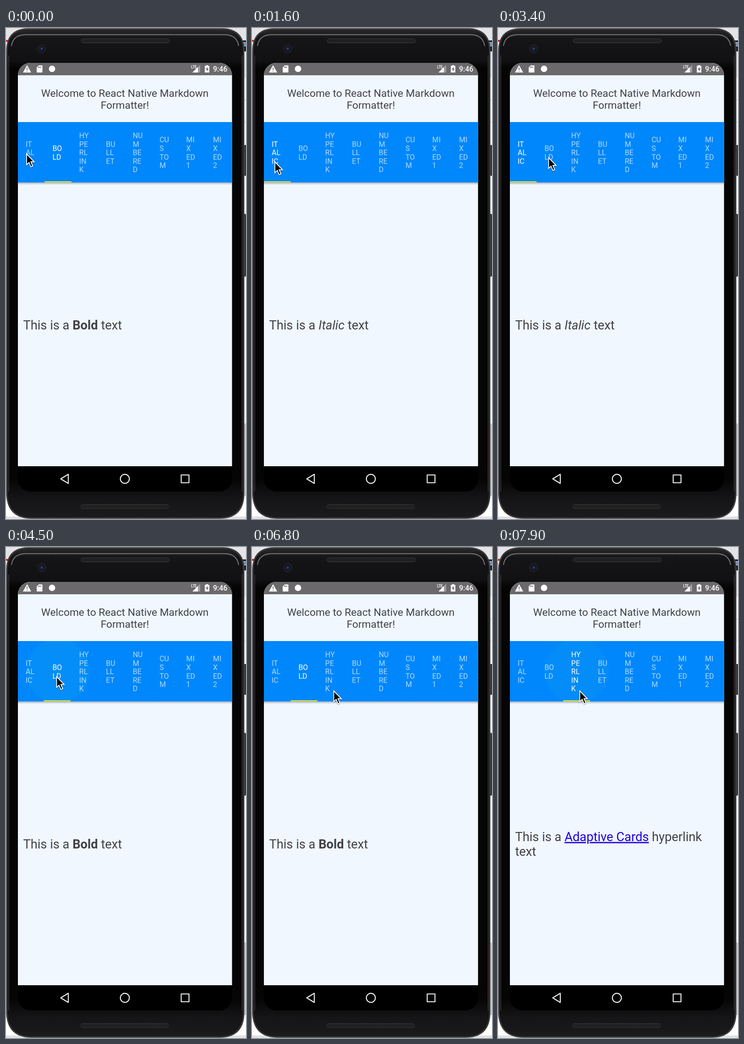
An HTML page that plays this animation: 524 px wide and 1070 px high, repeating every 8000 ms.

```html
<!DOCTYPE html>
<html lang="en">
<head>
<meta charset="utf-8">
<title>Markdown formatter tabs</title>
<style>
  html, body { margin: 0; width: 100%; height: 100%; overflow: hidden; background: #e4e4e8; }
  svg { display: block; width: 524px; height: 1070px; font-family: Roboto, sans-serif; }
  .title { font-size: 22.73px; text-anchor: middle; fill: #414246; }
  .body { font-size: 27.27px; fill: #414246; }
  .body .link { fill: #2000e0; text-decoration: underline; }
  #labels { font-size: 15.91px; fill: #fff; }
</style>
</head>
<body>
<svg viewBox="0 0 524 1070">
  <defs>
    <linearGradient id="shell" x2="0" y2="1">
      <stop offset="0" stop-color="#29282a"/><stop offset=".02" stop-color="#151416"/>
      <stop offset=".065" stop-color="#111012"/><stop offset=".08" stop-color="#050505"/>
      <stop offset=".92" stop-color="#060506"/><stop offset=".96" stop-color="#151416"/>
      <stop offset="1" stop-color="#1b1a1c"/>
    </linearGradient>
    <linearGradient id="shade" x2="0" y2="1">
      <stop offset="0" stop-color="#6c7a88" stop-opacity=".6"/><stop offset="1" stop-color="#6c7a88" stop-opacity="0"/>
    </linearGradient>
    <pattern id="mesh" width="3" height="3" patternUnits="userSpaceOnUse">
      <rect width="3" height="3" fill="#1b1a1b"/><circle cx="1.5" cy="1.5" r=".8" fill="#383738"/>
    </pattern>
    <clipPath id="screen"><rect x="26" y="76" width="467.5" height="934" rx="27"/></clipPath>
    <clipPath id="bar"><rect x="26" y="205" width="467.5" height="131.5"/></clipPath>
  </defs>

  <!-- desktop behind the phone -->
  <path fill="#fff" d="M0 31H6V50H0ZM516 108H524V862H516ZM0 1020H524V1065H0Z"/>
  <path fill="#d32a22" d="M0 26H8V30H0Z"/>
  <path fill="#1d2530" d="M517 27H524V31H517ZM519 40H524V51H519Z"/>
  <path fill="#6a8fc4" d="M518 32H524V39H518Z"/>
  <path fill="#c9c9cd" d="M518 157H524V158H518ZM518 205H524V206H518ZM516 862H524V1020H516ZM0 1065H524V1066H0Z"/>
  <path fill="#38383a" d="M517 255H524V322H517ZM517 405H522Q524 405 524 409V538Q524 542 522 542H517Z"/>

  <!-- phone -->
  <path fill="url(#shell)" stroke="#3a393b" stroke-width="3"
    d="M2 48Q3 3 48 2H473Q518 3 519 48V1018Q517 1067 468 1068H54Q5 1067 2 1018Z"/>
  <path fill="none" stroke="#3a393c" stroke-width="1.5" d="M6 60V1010M515.500 60V1010"/>
  <path fill="none" stroke="#77767a" stroke-width="2" d="M12 39Q15 15 43 14.500H478Q504 15 508 39"/>
  <rect x="164" y="23.500" width="193" height="9" rx="4.500" fill="url(#mesh)" stroke="#3b3a3b"/>
  <rect x="163" y="1038.500" width="192" height="9" rx="4.500" fill="url(#mesh)" stroke="#343334"/>
  <circle cx="78" cy="45" r="9.500" fill="#19191d" stroke="#28282b"/>
  <circle cx="78" cy="45" r="5" fill="#111b35"/>
  <circle cx="78" cy="45" r="2" fill="#334b83"/>

  <g clip-path="url(#screen)">
    <path fill="#f0f7fe" d="M26 76H494V955H26Z"/>
    <path fill="#6b696b" d="M26 76H494V103H26Z"/>
    <path d="M26 955H494V1010H26Z"/>
  </g>

  <!-- status bar -->
  <g fill="#fff">
    <path d="M46 81L55 97H37Z"/>
    <path d="M71.500 81.500H78.500Q79.500 81.500 79.500 82.500V96Q79.500 97 78.500 97H68Q67 97 67 96V86Z"/>
    <circle cx="100.500" cy="89" r="7"/>
    <text x="404" y="87.500" font-size="8.500" font-weight="500" letter-spacing="-.6">LTE</text>
    <path opacity=".35" d="M424 80V97H407Z"/>
    <path d="M419 85V97H407Z"/>
    <path d="M437 81H441V82.500H444V97H434V82.500H437Z"/>
    <text x="452" y="95.300" font-size="15.910" font-weight="500">9:46</text>
  </g>
  <path fill="#6b696b" d="M45.200 86H46.900V91.500H45.200ZM45.200 93.200H46.900V95H45.200ZM70 84H71.500V87H70ZM72.500 84H74V87H72.500ZM75 84H76.500V87H75ZM440 84.500L436 90.500H438.500V95L442.300 89H440Z"/>

  <text class="title" x="259.500" y="149.800">Welcome to React Native Markdown</text>
  <text class="title" x="259.500" y="176.400">Formatter!</text>

  <!-- tabs -->
  <path fill="url(#shade)" d="M26 336H493.500V342H26Z"/>
  <path fill="#0187fc" d="M26 205H493.500V336.500H26Z"/>
  <g clip-path="url(#bar)"><circle id="ripple" cy="270.800" fill="#1cb4d8"/></g>
  <g id="labels"></g>
  <rect id="indicator" y="334" width="58.400" height="2.500" fill="#e6e03a"/>

  <g id="pages" class="body">
    <text x="37.400" y="656.800">This is a <tspan font-style="italic">Italic</tspan> text</text>
    <text x="37.400" y="656.800">This is a <tspan font-weight="700">Bold</tspan> text</text>
    <g>
      <text x="37.400" y="640.800">This is a <tspan class="link">Adaptive Cards</tspan> hyperlink</text>
      <text x="37.400" y="672.800">text</text>
    </g>
  </g>

  <!-- navigation -->
  <g fill="none" stroke="#ececec" stroke-width="2.200" stroke-linejoin="round">
    <path d="M136 972.500V992.500L119.500 982.500Z"/>
    <circle cx="259.500" cy="982.500" r="9.800"/>
    <path d="M382.500 974H399.500V991H382.500Z"/>
  </g>

  <path id="cursor" stroke="#fff" stroke-width="1.800" style="filter:drop-shadow(0 1px 1px #0006)"
    d="M0 0V23.500L5.300 18.500L9.300 28L13.300 26.300L9.300 17H16.500Z"/>
</svg>

<script>
const LOOP = 8000, TAB = 58.43, LEFT = 26;
const $ = id => document.getElementById(id);

const names = ['IT AL IC', 'BO LD', 'HY PE RL IN K', 'BU LL ET',
  'NU M BE RE D', 'CU S TO M', 'MI X ED 1', 'MI X ED 2'];
$('labels').innerHTML = names.map((name, tab) => {
  const lines = name.split(' ');
  return '<g>' + lines.map((line, i) => {
    const y = 277.2 + (i - (lines.length - 1) / 2) * 18.6;
    return `<text x="${LEFT + 17 + tab * TAB}" y="${y}">${line}</text>`;
  }).join('') + '</g>';
}).join('');

const taps = [{ at: 400, tab: 0 }, { at: 4100, tab: 1 }, { at: 7400, tab: 2 }];
const moves = [
  { start: 1400, end: 2200, from: [45, 274.5], to: [77, 385.5] },
  { start: 2700, end: 3300, from: [77, 385.5], to: [110.5, 282.5] },
  { start: 5700, end: 6500, from: [110.5, 282.5], to: [178.5, 313.5] },
];

const clamp = v => Math.min(1, Math.max(0, v));
const smooth = v => v * v * (3 - 2 * v);

// Critically damped spring, t in ms
function spring(t) {
  const x = 0.0172 * Math.max(0, t);
  return 1 - (1 + x) * Math.exp(-x);
}

function drawTabs(t) {
  let position = 1, page = 1, ripple = null;
  for (const tap of taps) {
    const since = t - tap.at;
    if (since < 0) break;
    position += (tap.tab - position) * spring(since - 100);
    if (since >= 100) page = tap.tab;
    ripple = { tab: tap.tab, since };
  }
  $('indicator').setAttribute('x', LEFT + position * TAB);
  [...$('labels').children].forEach((label, i) =>
    label.setAttribute('opacity', 0.68 + 0.32 * clamp(1 - Math.abs(position - i))));
  [...$('pages').children].forEach((el, i) => el.style.display = i === page ? '' : 'none');

  const circle = $('ripple');
  circle.setAttribute('opacity', ripple ? 0.16 * clamp((700 - ripple.since) / 300) : 0);
  if (ripple) {
    circle.setAttribute('cx', LEFT + (ripple.tab + 0.5) * TAB);
    circle.setAttribute('r', 70 * (1 - (1 - clamp((ripple.since + 50) / 280)) ** 2));
  }
}

function drawCursor(t) {
  const move = moves.filter(m => t >= m.start).pop() || moves[0];
  const k = smooth(clamp((t - move.start) / (move.end - move.start)));
  const [x, y] = move.from.map((v, i) => v + (move.to[i] - v) * k);
  $('cursor').setAttribute('transform', `translate(${x} ${y})`);
}

function frame() {
  const t = Math.floor(performance.now() % LOOP / 100) * 100;
  drawTabs(t);
  drawCursor(t);
  requestAnimationFrame(frame);
}
frame();
</script>
</body>
</html>
```
